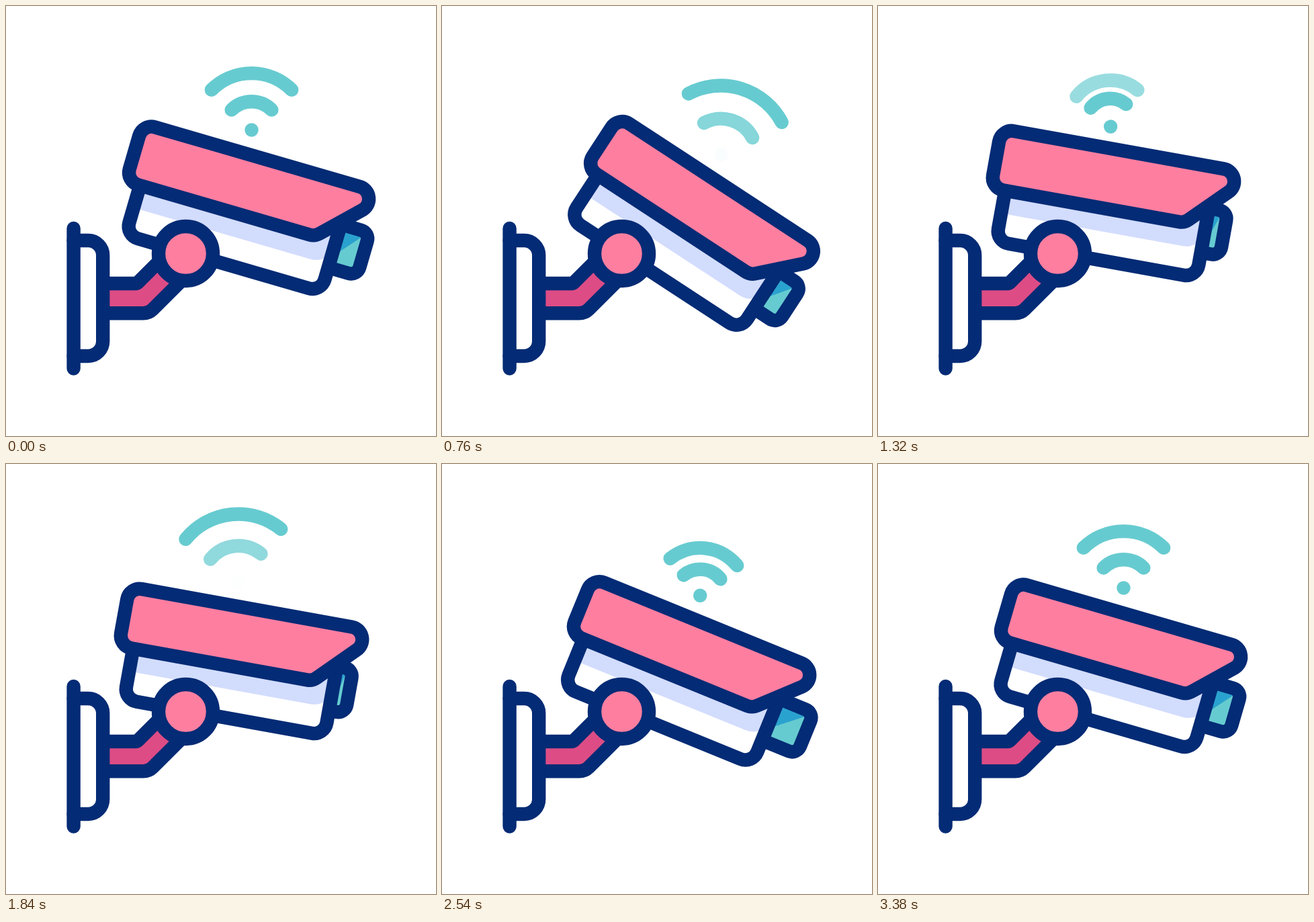
An HTML page with a canvas for the animation above (3.6 s loop, 640x640 px).

```html
<!DOCTYPE html>
<html>
<head>
<meta charset="utf-8">
<style>
html, body { margin: 0; width: 100%; height: 100%; overflow: hidden; background: #fff; }
canvas { display: block; width: 640px; height: 640px; }
</style>
</head>
<body>
<canvas id="stage" width="640" height="640"></canvas>
<script>
const ctx = document.getElementById('stage').getContext('2d');
const LOOP = 3600, LINE = 20.4, TILT = 16.2;
const PIVOT = [267.5, 368.5];
const NAVY = '#042b75', PINK = '#fe7ea0', ROSE = '#dd4c85', TEAL = '#66cbd0',
      BLUE = '#2aa2cf', PALE = '#d2dcfd', WHITE = '#fff';
const rad = deg => deg * Math.PI / 180;

// Smooth 0..1 ramp over a time span
function ease(t, start, length) {
  const u = Math.min(1, Math.max(0, (t - start) / length));
  return (1 - Math.cos(Math.PI * u)) / 2;
}

// Runs through moves of the form { at, to, length }
const follow = (t, from, moves) =>
  moves.reduce((value, { at, to, length }) => value + (to - value) * ease(t, at, length), from);

const swing = t => follow(t, 0, [
  { at: 0, to: 17, length: 500 },
  { at: 800, to: -6, length: 500 },
  { at: 1830, to: 6, length: 500 },
  { at: 2780, to: 0, length: 500 }
]);

const lensReach = t => follow(t, 244, [
  { at: 420, to: 223, length: 1320 },
  { at: 1740, to: 257.5, length: 960 },
  { at: 2700, to: 244, length: 690 }
]);

// Signal layers: 0 is the dot, 1 and 2 the arcs; each follows the one before it
const FADE = 200, FADE_LAG = 115, GROW = 850, GROW_LAG = 180;
const pulses = [
  { at: -200, from: 1, to: 1.27 },
  { at: 840, from: 0.74, to: 1.27 },
  { at: 1820, from: 0.74, to: 1 }
];

function signalAlpha(t, layer) {
  const fades = starts => starts.reduce((sum, at) => sum + ease(t, at + layer * FADE_LAG, FADE), 0);
  return 1 - fades([585, 1655]) + fades([970, 1990]);
}

function signalRadius(t, layer) {
  const own = t - layer * GROW_LAG;
  const pulse = pulses.filter(p => p.at <= own).pop() || pulses[0];
  return 42.2 * layer * follow(own, pulse.from, [{ ...pulse, length: GROW }]);
}

const dotDip = t => t < 980 ? 0 : 6.8 * (1 - ease(t, 980, 820));

function paint(fill, stroke) {
  if (fill) { ctx.fillStyle = fill; ctx.fill(); }
  if (stroke) { ctx.strokeStyle = stroke; ctx.stroke(); }
}

// Points are [x, y, cornerRadius]; the first and last points stay sharp
function shape(points, fill, stroke, closed) {
  ctx.beginPath();
  points.forEach(([x, y, r], i) => {
    const next = points[i + 1];
    if (r && next) ctx.arcTo(x, y, next[0], next[1], r);
    else ctx.lineTo(x, y);
  });
  if (closed) ctx.closePath();
  paint(fill, stroke);
}

function arc(x, y, r, fill, stroke, from = 0, to = 360) {
  ctx.beginPath();
  ctx.arc(x, y, r, rad(from), rad(to));
  paint(fill, stroke);
}

// Three-sided tray, open at the top
const tray = (left, right, top, bottom, leftR, rightR) =>
  [[left, top], [left, bottom, leftR], [right, bottom, rightR], [right, top]];

function drawMount() {
  shape([[144, 413], [195, 413, 4], [239, 369], [270, 400], [212.5, 457.3, 20], [144, 457.3]], ROSE, NAVY);
  shape([[100.6, 349], [144.2, 349, 22], [144.2, 521, 22], [100.6, 521]], WHITE, NAVY);
  shape([[100.6, 331], [100.6, 539.5]], null, NAVY);
}

function drawCamera(reach) {
  const edge = reach + LINE / 2;
  const lens = [[200, -106.3], [edge, -106.3, 13], [edge, -39.4, 13], [200, -39.4]];
  shape(lens, TEAL);
  shape([[200, -106], [reach, -106], [reach, -96], [216, -63], [200, -63]], BLUE);
  shape(lens, null, NAVY);

  const body = tray(-93.6, 209.5, -105, -1.5, 19, 19);
  shape(body, WHITE);
  shape(tray(-93.6, 210.5, -105, -44, 0, 29), PALE);
  shape(body, null, NAVY, true);

  shape([[0, -167.9], [266.7, -167.9, 19], [177.2, -78.4, 19], [-115.5, -78.4, 19],
         [-115.5, -167.9, 19], [0, -167.9]], PINK, NAVY, true);
}

function drawSignal(t) {
  ctx.save();
  ctx.translate(98, -184);
  for (let layer = 0; layer < 3; layer++) {
    ctx.globalAlpha = signalAlpha(t, layer);
    if (layer) arc(0, 0, signalRadius(t, layer), null, TEAL, -135, -45);
    else arc(0, dotDip(t), LINE / 2, TEAL);
  }
  ctx.restore();
}

function draw(t) {
  ctx.clearRect(0, 0, 640, 640);
  ctx.lineWidth = LINE;
  ctx.lineCap = ctx.lineJoin = 'round';
  drawMount();

  ctx.save();
  ctx.translate(...PIVOT);
  ctx.rotate(rad(swing(t)));
  drawSignal(t);
  ctx.rotate(rad(TILT));
  drawCamera(lensReach(t));
  ctx.restore();

  arc(...PIVOT, 40.5, PINK, NAVY);
}

const start = performance.now();
function tick() {
  draw((performance.now() - start) % LOOP);
  requestAnimationFrame(tick);
}
tick();
</script>
</body>
</html>
```
